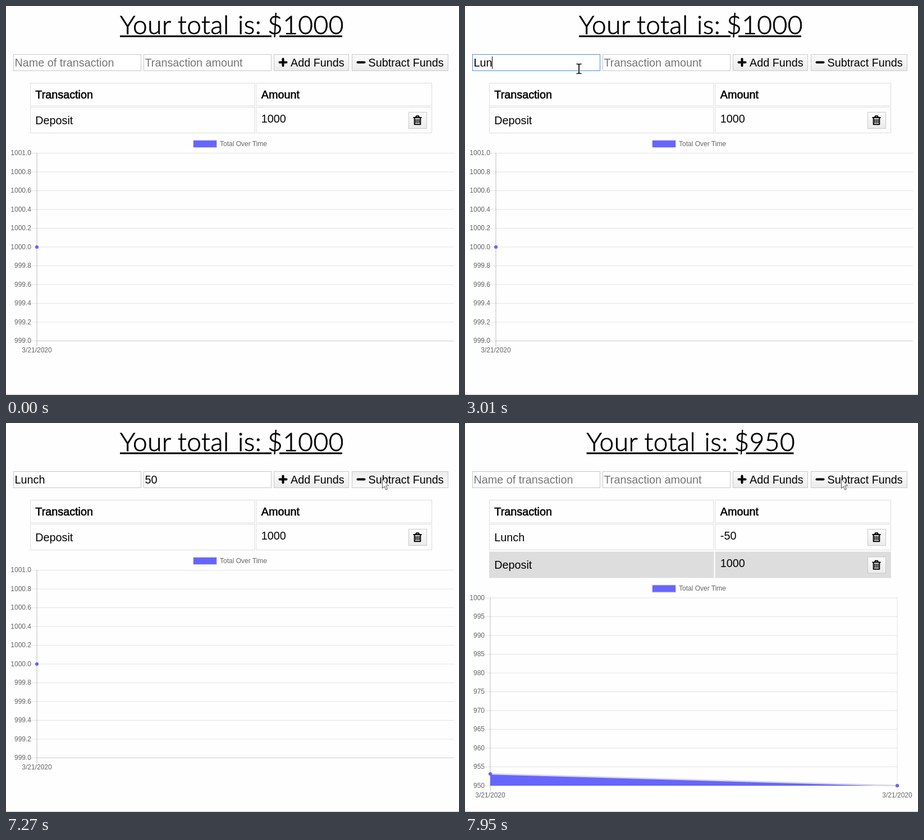
Write an HTML page that moves like this. It is 807 px wide and 694 px high and loops after 8 s.

```html
<!DOCTYPE html>
<html lang="en">
<head>
<meta charset="utf-8">
<title>Budget tracker</title>
<style>
  html, body { margin: 0; width: 100%; height: 100%; overflow: hidden; background: #fefefe; }
  svg { display: block; width: 807px; height: 694px; font: 19.8px "Liberation Sans", Arial, sans-serif; }
  .title { font: 300 46px Lato, sans-serif; letter-spacing: .5px; stroke: #000; stroke-width: .8px; }
  .head { stroke: #000; stroke-width: .6px; }
  .hint { fill: #757575; }
  .small { font-size: 12px; fill: #666; }
</style>
</head>
<body>
<svg id="stage" viewBox="0 0 807 694"></svg>
<script>
const LOOP = 8000;
const BLUE = '#6666ff';
const SUBMIT = 7390;

// Tables of [time, value]; a value holds until the next entry.
const focusSteps = [[0, ''], [1970, 'name'], [3900, 'amount'], [7000, '']];
const nameSteps = [[0, ''], [2650, 'L'], [2830, 'Lu'], [3010, 'Lun'], [3500, 'Lunch'], [SUBMIT, '']];
const amountSteps = [[0, ''], [5380, '5'], [5430, '50'], [SUBMIT, '']];
const caretSteps = [
  [0, 0], [1970, 16.5], [2470, 0], [2650, 26.5], [2830, 37.5], [3010, 48.5], [3500, 70.5],
  [3900, 248.5], [4370, 0], [4930, 248.5], [5380, 259.5], [5430, 269.5], [6000, 0],
  [6500, 269.5], [7000, 0]
];
const buttonSteps = [[0, 'idle'], [6690, 'hover'], [7000, 'active'], [SUBMIT, 'hover'], [7950, 'idle']];
const chartTimes = [[0, SUBMIT], [7450, 7450], [7510, 7510], [7760, 7760], [7950, 7950]];

// Pointer moves: start, end, number of steps, from x y, to x y.
const moves = [
  [210, 410, 3, 638, 680, 599, 645],
  [790, 900, 3, 599, 645, 259, 333],
  [1080, 1730, 10, 259, 333, 200, 112],
  [1910, 2160, 4, 200, 112, 203, 112],
  [6000, 6000, 1, 203, 112, 237, 107],
  [6060, 6270, 4, 237, 107, 586, 182],
  [6450, 6750, 6, 586, 182, 670, 100]
];

const at = (table, t) => table.filter(row => row[0] <= t).pop()[1];

const text = (x, y, s, cls = '', anchor = 'start') =>
  `<text x="${x}" y="${y}" class="${cls}" text-anchor="${anchor}">${s}</text>`;
const rect = (x, y, w, h, fill, stroke = 'none') =>
  `<rect x="${x}" y="${y}" width="${w}" height="${h}" fill="${fill}" stroke="${stroke}"/>`;
const line = (x1, y1, x2, y2, alpha = .1) =>
  `<path d="M${x1} ${y1}L${x2} ${y2}" stroke="#000" stroke-opacity="${alpha}"/>`;

function title(amount, left, right) {
  const words = [['Your', 0], ['total', 103], ['is:', 210], [amount, 263]];
  return words.map(([word, dx]) => text(left + dx, 50, word, 'title')).join('') +
    rect(left, 52.5, 270, 3, '#000') + rect(left + 284, 52.5, right - left - 284, 3, '#000');
}

function field(x, value, hint, focused) {
  return rect(x + .5, 86.5, 227, 29, '#fff', focused ? '#4a8df0' : '#c6c6c6') +
    (value ? text(x + 2.5, 107.7, value) : text(x + 2.5, 107.7, hint, 'hint'));
}

const spinner = rect(455, 89, 15, 24, '#f0f0f0') +
  '<path d="M459 98l3.5-4 3.5 4zM459 104.5l3.5 4 3.5-4z" fill="#505050"/>';

function button(x, y, w, state = 'idle') {
  return rect(x + .5, y + .5, w, 29, state === 'active' ? 'url(#down)' : 'url(#up)',
    state === 'hover' ? '#999' : '#c8c8c8');
}

function trash(y) {
  return button(717, y, 32) + `<g transform="translate(733 ${y + 15})" fill="none" stroke="#000">
    <path d="M-7.5-5H7.5M-3-5.5L-2-7.7H2L3-5.5" stroke-width="2"/>
    <path d="M-5.3-5V7.2H5.3V-5" stroke-width="2" stroke-linejoin="round"/>
    <path d="M-2.7-2.5V5M0-2.5V5M2.7-2.5V5" stroke-width="1.6"/></g>`;
}

function row(y, name, amount, shaded) {
  const fill = shaded ? '#ddd' : '#fefefe';
  return rect(43.5, y + .5, 399.5, 46, fill, '#ddd') + rect(446, y + .5, 312.5, 46, fill, '#ddd') +
    text(52.3, y + 30.5, name) + text(454.8, y + 27.5, amount) + trash(y + 9);
}

const tableHead = rect(43.5, 137.5, 399.5, 40.5, 'none', '#ddd') +
  rect(446, 137.5, 312.5, 40.5, 'none', '#ddd') +
  text(52.3, 164.5, 'Transaction', 'head') + text(454.8, 164.5, 'Amount', 'head');

const dot = (x, y) =>
  `<circle cx="${x}" cy="${y}" r="3" fill="${BLUE}" stroke="#000" stroke-opacity=".1"/>`;

function chart(top, left, right, labels) {
  const bottom = top + 335;
  let out = rect(333.5, top - 22.5, 42, 13, BLUE, '#dcdce6') +
    text(381, top - 12.4, 'Total Over Time', 'small');
  labels.forEach((label, i) => {
    const y = top + i * 33.5;
    out += line(left - 10, y + .5, right, y + .5) + text(left - 10, y + 4.3, label, 'small', 'end');
  });
  const date = x => text(x, bottom + 21.3, '3/21/2020', 'small', 'middle');
  return out + line(left, bottom + .5, right, bottom + .5) +
    line(left, top, left, bottom + 10, .25) + date(left) +
    (labels[0] === '1000' ? line(right, top, right, bottom + 10) + date(right) : '');
}

const range = (start, step, digits) =>
  Array.from({ length: 11 }, (_, i) => (start - i * step).toFixed(digits));

function area(t) {
  const rest = (1 - (at(chartTimes, t) - 7317) / 1268) ** 4;
  const y = 647 - 335 * rest;
  return `<path d="M45 ${y}L770 647H45Z" fill="${BLUE}"/>
    <path d="M45 ${y}L770 647" stroke="#d9d9e3" stroke-width="2.5"/>` + dot(45, y) + dot(770, 647);
}

function pointer(t) {
  const move = moves.filter(m => m[0] <= t).pop();
  if (!move) return '';
  const [start, end, steps, x0, y0, x1, y1] = move;
  const gap = (end - start) / (steps - 1 || 1) || 1;
  const part = Math.min(steps, Math.floor((t - start) / gap + 1e-6) + 1) / steps;
  const x = x0 + (x1 - x0) * part;
  const y = y0 + (y1 - y0) * part;
  const beam = 'M-4.5-8.5H-1.5L0-7.5L1.5-8.5H4.5M0-7.5V7.5M-4.5 8.5H-1.5L0 7.5L1.5 8.5H4.5';
  const shape = x < 473 && y > 86 && y < 116
    ? `<path d="${beam}" stroke="#fff" stroke-width="3.5" fill="none"/>
       <path d="${beam}" stroke="#000" stroke-width="1.7" fill="none"/>`
    : '<path d="M.5.5V16.5L4.2 13L6.8 19.2L9.3 18.1L6.7 12H11.7Z" fill="#fff" stroke="#555"/>';
  return `<g transform="translate(${x} ${y})">${shape}</g>`;
}

const defs = `<defs>
  <linearGradient id="up" x2="0" y2="1"><stop stop-color="#fcfcfc"/><stop offset="1" stop-color="#ebebeb"/></linearGradient>
  <linearGradient id="down" x2="0" y2="1"><stop stop-color="#ececec"/><stop offset="1" stop-color="#fafafa"/></linearGradient>
</defs>`;

const icons = `<path d="M493.5 94.5V106.5M487.5 100.5H499.5" stroke="#000" stroke-width="4" stroke-linecap="round"/>
  <path d="M626.5 100.5H638.5" stroke="#000" stroke-width="4" stroke-linecap="round"/>`;

const before = title('$1000', 203, 599) + row(180, 'Deposit', '1000') +
  chart(262, 55, 798, range(1001, .2, 1)) + dot(55, 430);
const after = title('$950', 216.5, 585.5) + row(180, 'Lunch', '-50') + row(229.5, 'Deposit', '1000', true) +
  chart(311.5, 45, 770, range(1000, 5, 0));

function scene(t) {
  const focus = at(focusSteps, t);
  const caret = at(caretSteps, t);
  return defs + tableHead + (t < SUBMIT ? before : after + area(t)) +
    field(13, at(nameSteps, t), 'Name of transaction', focus === 'name') +
    field(245, at(amountSteps, t), 'Transaction amount', focus === 'amount') +
    (focus === 'amount' ? spinner : '') +
    button(477, 86, 133) + button(616, 86, 171, at(buttonSteps, t)) + icons +
    text(507, 107.7, 'Add Funds') + text(645.5, 107.7, 'Subtract Funds') +
    (caret ? line(caret, 90, caret, 112, 1) : '') +
    rect(0, 693, 807, 1, '#c4c4c4') + pointer(t);
}

const stage = document.getElementById('stage');
const begin = performance.now();
let shown = '';

function draw() {
  const next = scene((performance.now() - begin) % LOOP);
  if (next !== shown) stage.innerHTML = shown = next;
  requestAnimationFrame(draw);
}
draw();
</script>
</body>
</html>
```
